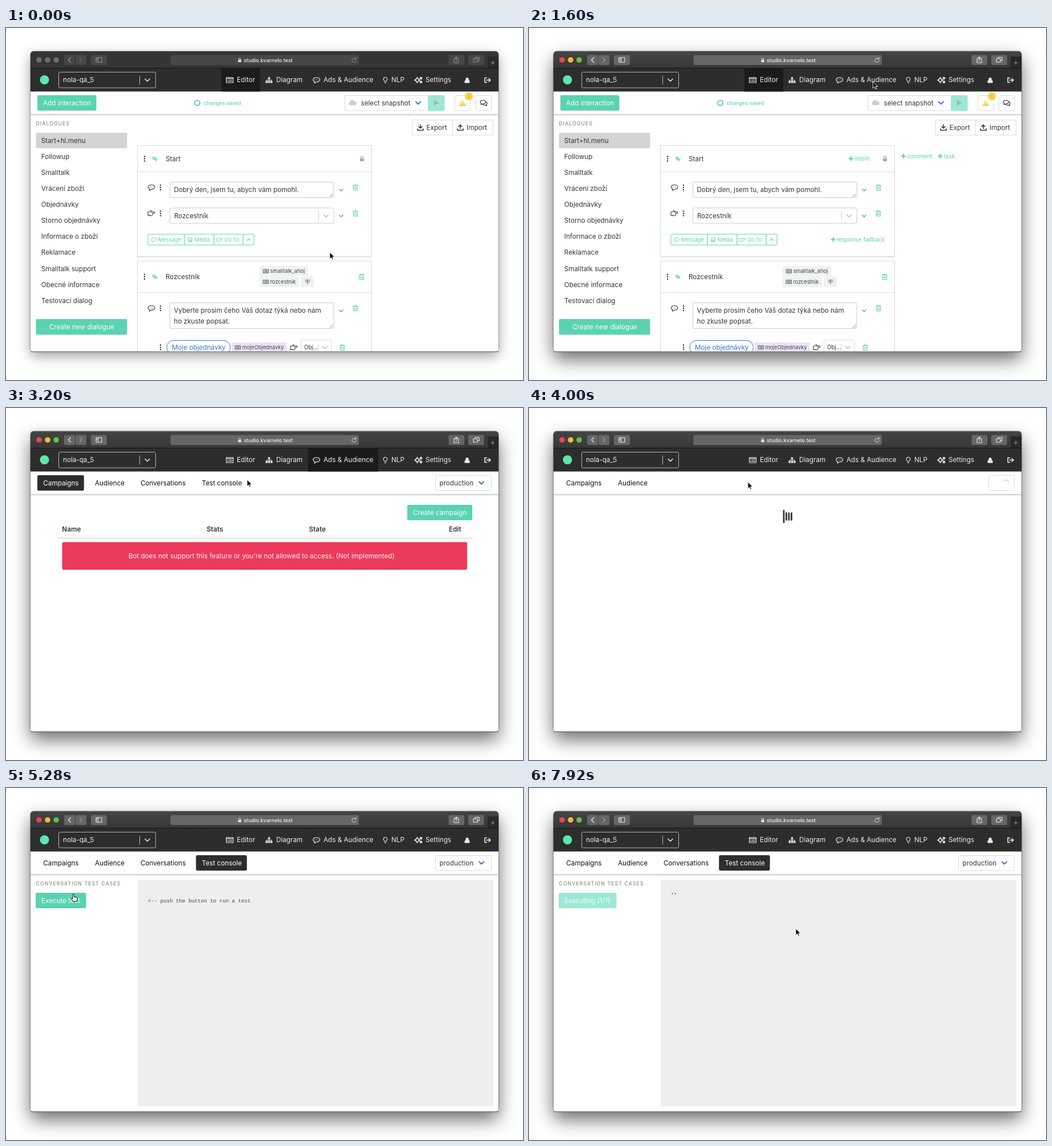
These frames come from a looping animation (907x618 px, 8000 ms). An HTML page:

```html
<!DOCTYPE html>
<html lang="en">
<head>
<meta charset="utf-8">
<title>Bot editor</title>
<style>
html, body { margin: 0; width: 100%; height: 100%; overflow: hidden; background: #fff; }
#shadow { position: absolute; left: 43px; top: 41px; width: 821px; height: 527px; border-radius: 6px;
  box-shadow: 0 0 1px 1px rgba(0,0,0,.35), 0 14px 32px rgba(0,0,0,.58); }
#shadow.idle { box-shadow: 0 0 1px 1px rgba(0,0,0,.3), 0 8px 22px rgba(0,0,0,.38); }
svg { position: absolute; left: 0; top: 0; }
text { font-family: Inter, Roboto, sans-serif; white-space: pre; }
</style>
</head>
<body>
<div id="shadow"></div>
<svg id="stage" width="907" height="618" viewBox="0 0 907 618"></svg>
<script>
const TEAL = '#5bd2b2', PALE = '#9ce8d6', INK = '#363636', DARK = '#2d2d2d', LINE = '#dbdbdb', BLUE = '#3b74cf', LIGHT = '#eee';
const $ = id => document.getElementById(id);

// Outline icons, centred on 0,0
const OUTLINE = {
  down: 'M-4-2L0 2 4-2', up: 'M-3 1.5L0-1.5 3 1.5', left: 'M2-4L-2 0 2 4', right: 'M-2-4L2 0-2 4',
  dots: 'M0-4h.01M0 0h.01M0 4h.01',
  comment: 'M0-4.5C8-4.5 8 3 0 3.2L-3.5 5.2-3 2.6C-8 1-6-4.5 0-4.5ZM-2.6-.6h.1M0-.6h.1M2.6-.6h.1',
  hand: 'M-6-2.5h2.5l2-2.3q2-.5 1 2.2h5.5q1.8 1.2 0 2.4h-3q1 4.2-3 4.3l-3-.7h-2Z',
  trash: 'M-4.5-3.5h9M-1.5-3.5v-1.3h3v1.3M-3.5-3.5v8.3h7v-8.3M-1.2-1.3v4M1.2-1.3v4',
  link: 'M-3.8-1.2l2-2 2.4 2.4-2 2ZM-.4 .8l2-2 2.4 2.4-2 2Z',
  keys: 'M-4.5-3h9v6h-9zM-2.8-1h5.6M-2.8 1h5.6',
  list: 'M-6-4.5h12v9h-12zM-6-3h12M-4-.5h1M-1.5-.5h5.5M-4 2h1M-1.5 2h5.5',
  bulb: 'M-1.5 2.5c0-2-1.8-2-1.8-4.2a3.3 3.3 0 0 1 6.6 0c0 2.2-1.8 2.2-1.8 4.2zM-1.2 4.7h2.4',
  cogs: 'M-5 0a3 3 0 1 0 6 0a3 3 0 1 0-6 0M-2-4.8v1M-2 3.8v1M-6.8 0h1M1.8 0h1M3-3.3a1.5 1.5 0 1 0 3 0a1.5 1.5 0 1 0-3 0M3 3.3a1.5 1.5 0 1 0 3 0a1.5 1.5 0 1 0-3 0',
  exit: 'M-1.5-4h-3.5v8h3.5M-2 0h6M2-2.7l3 2.7-3 2.7',
  save: 'M0-5v6M-3-1.5l3 3 3-3M-5 2.5v2.5h10v-2.5',
  load: 'M0 2v-6M-3-1.5l3-3 3 3M-5 2.5v2.5h10v-2.5',
  chat: 'M-1-4.5c6 0 6 6 0 6l-4 1.5 1-2c-4-2-2-5.5 3-5.5zM4.5-2c2.5 2 1.5 4 0 5l1 2-4-1.2q-2 .3-3-.8',
  image: 'M-4-4h8v8h-8zM-3 3l2-3 1.5 1.5 1.2-2 1.3 3.5zM-1.6-2h.1',
  sign: 'M0-4v8M-4-2.8h8M-4 0h8',
  plus: 'M-3.2 0h6.4M0-3.2v6.4',
  panel: 'M-5-4h10v8h-10zM-1.5-4v8M-4-2h1M-4 0h1',
  share: 'M-2-2h-2v7h8v-7h-2M0 2v-7M-2-3l2-2 2 2',
  tabs: 'M-5-2h7v6h-7zM-2-2v-2.5h7v6h-3',
  reload: 'M3.5-2a4 4 0 1 0 .6 2.5M1-2.5h3v-3'
};
const SOLID = {
  lock: 'M-3.5 0h1v-2a2.5 2.5 0 0 1 5 0v2h1v5h-7ZM-1.2 0h2.4v-2a1.2 1.2 0 0 0-2.4 0Z',
  tree: 'M-1.8-5h3.6v3h-3.6zM-6 1.5h3.4v3.4h-3.4zM-1.7 1.5h3.4v3.4h-3.4zM2.6 1.5h3.4v3.4h-3.4zM-4.8-.5h9.6v1h-9.6zM-.5-2h1v4h-1zM-4.8 0h1v2h-1zM3.8 0h1v2h-1z',
  user: 'M-4.5 5q-.5-5 2-5a2.9 2.9 0 1 1 5 0q2.5 0 2 5z',
  cloud: 'M-4 4a3.2 3.2 0 0 1-.5-6a4 4 0 0 1 7.6-.6a3.2 3.2 0 0 1 .9 6.6z',
  play: 'M-4.5-5L5 0-4.5 5z',
  warn: 'M0-5.5L6.5 5.5h-13z'
};

const path = (d, fill, stroke = 'none', w = 1, more = '') =>
  `<path d="${d}" fill="${fill}" stroke="${stroke}" stroke-width="${w}" stroke-linecap="round" stroke-linejoin="round" ${more}/>`;
const icon = (name, x, y, color = INK, w = 1.1, scale = 1) => {
  const at = `transform="translate(${x} ${y}) scale(${scale})"`;
  return SOLID[name] ? path(SOLID[name], color, 'none', 0, at) : path(OUTLINE[name], 'none', color, w, at);
};
const box = (x1, y1, x2, y2, fill = '#fff', stroke = 'none', r = 2) =>
  `<rect x="${x1}" y="${y1}" width="${x2 - x1}" height="${y2 - y1}" rx="${r}" fill="${fill}" stroke="${stroke}"/>`;
const dot = (x, y, r, fill, more = '') => `<circle cx="${x}" cy="${y}" r="${r}" fill="${fill}" ${more}/>`;
const rule = (x1, y1, x2, y2, color = LINE, w = 1) => path(`M${x1} ${y1}L${x2} ${y2}`, 'none', color, w);
// y is the middle of the capitals
const text = (x, y, s, color = INK, size = 11.7, more = '') =>
  `<text x="${x}" y="${y + size * .36}" fill="${color}" font-size="${size}" ${more}>${s.replace(/&/g, '&amp;').replace(/</g, '&lt;')}</text>`;
const label = (y, s) => text(52.5, y, s, '#777', 8.7, 'letter-spacing="1.1"');
const button = (x1, y1, x2, s, fill = TEAL, color = '#f4fffb') =>
  box(x1, y1, x2, y1 + 27, fill) + text(x1 + 10, y1 + 13.5, s, color);
const group = (id, body) => `<g id="${id}">${body}</g>`;

function titleBar(on) {
  const btn = on ? '#666' : '#474747', fg = on ? '#e8e8e8' : '#929292';
  const lights = on ? ['#ea4459', '#f6b73c', '#5fc148'] : ['#6d6d6d', '#6d6d6d', '#6d6d6d'];
  return box(43, 41, 864, 71, on ? 'url(#bar)' : '#353535', 'none', 0) +
    lights.map((c, i) => dot(58 + i * 15, 56, 4.8, c)).join('') +
    [[102, 121], [122, 141], [149, 177], [288.5, 619], [776.5, 804], [811, 838.5]]
      .map(([a, b]) => box(a, 47.5, b, 65, btn, 'none', 2.5)).join('') +
    icon('left', 111.5, 56, fg, 1.3) + icon('right', 131.5, 56, on ? '#999' : '#666', 1.2) +
    icon('panel', 163, 56, fg) + icon('lock', 410, 56, '#ddd', 1, .8) +
    text(417, 56.3, 'studio.kvarnelo.test', '#f2f2f2', 9.05, 'font-weight="500"') +
    icon('reload', 610.5, 56.5, fg, 1, .9) + icon('share', 790, 56, fg) + icon('tabs', 825, 56, fg) +
    box(845, 50, 864, 70, '#282828', 'none', 0) + icon('plus', 854, 61, '#999', 1) +
    rule(43, 70.5, 864, 70.5, '#151515');
}

const nav = box(43, 71, 864, 111.5, DARK, 'none', 0) +
  group('navEditor', box(378, 71, 446, 111.5, '#1b1b1b', 'none', 0)) +
  group('navAds', box(530, 71, 653, 111.5, '#1b1b1b', 'none', 0)) +
  dot(67.5, 91, 8, '#5ee6ad') +
  box(92.5, 77.5, 262.5, 105, DARK, '#b5b5b5') + text(100, 91, 'nola-qa_5', LIGHT) +
  rule(234.5, 84, 234.5, 99, '#bbb') + icon('down', 248, 91.5, LIGHT, 1.5) +
  [['list', 392.5, 'Editor', 405], ['tree', 461.5, 'Diagram', 474], ['comment', 544.5, 'Ads & Audience', 557],
   ['bulb', 665.5, 'NLP', 676], ['cogs', 723.5, 'Settings', 736]]
    .map(([i, x, s, tx]) => icon(i, x, 91.5, LIGHT, i == 'cogs' ? 1.7 : 1.1) + text(tx, 91, s, LIGHT)).join('') +
  icon('user', 809, 91.5, LIGHT) + icon('exit', 845, 91.5, LIGHT, 1.5) +
  box(43, 151, 864, 155, 'url(#edge)', 'none', 0);

const card = (y1, y2, head) => box(230.5, y1 + 1, 641.5, y2 + 1.5, '#ddd', 'none', 0) +
  box(230.5, y1, 641, y2, '#fff', LINE, 0) + rule(231, head, 640, head) +
  icon('dots', 243, (y1 + head) / 2, INK, 2.6) + icon('link', 261, (y1 + head) / 2, TEAL, 1.3);
const row = (y, kind, h = 27) => icon(kind, 255, y, INK, 1.1) + icon('dots', 271, y, INK, 2.6) +
  box(287.5, y - 9.5, 575, y - 9.5 + h, '#fff', '#ccc') + icon('down', 588, y + 4.5, BLUE, 1.3, .8) + icon('trash', 613, y, TEAL);
const grip = y => path(`M568 ${y}l5-5M571 ${y}l2-2`, 'none', '#777', .8);
const add = (x, y, s) => icon('plus', x, y, TEAL, 2) + text(x + 6, y, s, TEAL, 10.1);
const tool = (x1, x2, i, s) => box(x1, 362, x2, 381, '#fff', TEAL, 1) +
  icon(i, x1 + 10, 371.8, TEAL, 1.1, .8) + text(x1 + 18, 371.5, s, TEAL, 9.3);
const tag = (x1, y, x2, s, fill) => box(x1, y - 9, x2, y + 9, fill) + icon('keys', x1 + 11, y, '#555', 1) + text(x1 + 18.5, y, s, '#444', 9.2);

const dialogues = ['Start+hl.menu', 'Followup', 'Smalltalk', 'Vrácení zboží', 'Objednávky', 'Storno objednávky',
  'Informace o zboží', 'Reklamace', 'Smalltalk support', 'Obecné informace', 'Testovací dialog'];

const editor = button(55, 118, 158.5, 'Add interaction') +
  dot(335.5, 131.5, 4.5, 'none', `stroke="${TEAL}" stroke-width="2"`) +
  text(347, 131.3, 'changes saved', TEAL, 9.05, 'font-weight="500"') +
  box(594.5, 118.5, 769, 145, '#fff', LINE) + box(740, 118, 769.5, 145.5, PALE) +
  icon('cloud', 608, 131.5, '#ccc') + text(622.5, 131.5, 'select snapshot') +
  icon('down', 723, 131.5, BLUE, 2) + icon('play', 755, 131.5, '#a3b5b0') +
  box(787.5, 118.5, 815, 145, '#fff', LINE) + icon('warn', 801, 131.5, '#fad55c') + rule(801, 129, 801, 133, '#fff', 1.3) +
  dot(812, 120, 7, '#fbd04e') + text(810.2, 120, '1', '#e0a92c', 7) +
  box(824.5, 118.5, 851.5, 145, '#fff', LINE) + icon('chat', 838, 131.5, INK, 1.2) +
  label(167.5, 'DIALOGUES') + box(52.5, 184, 212.5, 211, '#d3d3d3') +
  dialogues.map((s, i) => text(61.8, 197.5 + i * 28.1, s)).join('') +
  box(52.5, 511, 212.5, 538.5, TEAL) + text(76, 524.8, 'Create new dialogue', '#f4fffb') +
  box(713, 161.5, 854.5, 188, '#fff', LINE) + rule(783.5, 162, 783.5, 188) +
  icon('save', 727, 174.5, INK, 1.6) + text(737.5, 175, 'Export') + icon('load', 797, 174.5, INK, 1.6) + text(808, 175, 'Import') +
  card(206.5, 401, 252.5) + text(280, 229.5, 'Start') + icon('lock', 624.5, 229, '#aaa') +
  row(280, 'comment') + text(294.5, 284, 'Dobrý den, jsem tu, abych vám pomohl.') + grip(296) +
  row(325.5, 'hand') + text(295, 329.8, 'Rozcestník') + rule(548.5, 322, 548.5, 337, '#ccc') + icon('down', 561.5, 330, '#bbb', 1.6) +
  tool(249, 313, 'comment', 'Message') + tool(313, 365, 'image', 'Media') + tool(365, 416, 'hand', 'Go To') +
  box(416, 362, 435, 381, '#fff', TEAL, 1) + icon('up', 425.5, 371.5, TEAL) +
  group('hover', add(565, 229.5, 'intent') + add(533.5, 371.5, 'response fallback') + add(657, 225, 'comment') + add(721.5, 225, 'task')) +
  card(409, 600, 464.5) + text(280, 437, 'Rozcestník') + icon('trash', 624, 437, TEAL) +
  tag(445, 427, 530, 'smalltalk_ahoj', '#f1f1f1') + tag(445, 445.7, 514, 'rozcestnik', '#ecf3f0') +
  box(517.5, 436.7, 540, 454.7, '#f0f0f0') + icon('sign', 529, 445.7, '#888', 1.3) +
  row(492, 'comment', 45) + text(294.5, 496, 'Vyberte prosím čeho Váš dotaz týká nebo nám') + text(294.5, 514.5, 'ho zkuste popsat.') + grip(526) +
  icon('dots', 271, 560.5, INK, 2.6) + box(282, 548.5, 393.5, 573, '#fff', BLUE, 12) + text(291, 560.8, 'Moje objednávky', BLUE) +
  tag(396, 560.8, 493, 'mojeObjednavky', '#ebe3f8') + icon('hand', 505, 561, INK) +
  box(517.5, 548, 571, 576, '#fff', LINE) + text(523, 560.5, 'Obj...', INK, 9.8) + rule(547.5, 554, 547.5, 567) +
  icon('down', 559.5, 561, '#bbb', 1.5) + icon('trash', 590, 561, TEAL);

const tab = (x, s, on) => on
  ? box(x - 10.3, 118, x + on, 145, DARK, 'none', 2.5) + text(x, 131.7, s, '#fff')
  : text(x, 131.7, s, '#111');
const tabs = (active, ready) => tab(65.3, 'Campaigns', active == 1 && 71.5) + tab(156, 'Audience') +
  (ready
    ? tab(236, 'Conversations') + tab(343.6, 'Test console', active == 2 && 79) +
      box(753.5, 118.5, 851.5, 145, '#fff', LINE) + text(760.5, 131.7, 'production') + icon('down', 834, 131.5, BLUE, 2)
    : box(806.5, 118.5, 851.5, 145, '#fff', LINE));

const campaigns = tabs(1, true) + button(704, 170, 818, 'Create campaign') +
  [[98.3, 'Name'], [352, 'Stats'], [531.5, 'State'], [777, 'Edit']]
    .map(([x, s]) => text(x, 213, s, INK, 11.7, 'font-weight="600"')).join('') +
  rule(90, 228.5, 818, 228.5, LINE, 1.5) + box(98.5, 235.5, 809, 284, '#ec3a5c', 'none', 3) +
  text(214.7, 260, "Bot does not support this feature or you're not allowed to access. (Not implemented)", '#ffeef1');

const consoleBase = tabs(2, true) + label(167.5, 'CONVERSATION TEST CASES') + box(231, 161, 855, 559, LIGHT, 'none', 0);
const ready = button(52, 184, 140.5, 'Execute test') +
  text(249, 197.3, '<-- push the button to run a test', '#444', 9.1, 'style="font-family:\'Liberation Mono\',monospace"');
const running = button(52, 184, 153.5, 'Executing (1/?)', PALE) +
  dot(251.5, 185.5, .9, '#333', 'id="dot1"') + dot(257, 185.5, .9, '#333', 'id="dot2"');

$('stage').innerHTML = `<defs>
  <linearGradient id="bar" x2="0" y2="1"><stop stop-color="#444"/><stop offset="1" stop-color="#373737"/></linearGradient>
  <linearGradient id="edge" x2="0" y2="1"><stop stop-color="#bdbdbd"/><stop offset=".4" stop-color="#e4e4e4"/><stop offset="1" stop-color="#fff"/></linearGradient>
  <clipPath id="win">${box(43, 41, 864, 568.5, '#fff', 'none', 5)}</clipPath></defs>
  <g clip-path="url(#win)">` + box(43, 41, 864, 569, '#fff', 'none', 0) +
  group('barOff', titleBar(false)) + group('barOn', titleBar(true)) + nav +
  group('editor', editor) + group('wait1', tabs(1)) + group('wait2', tabs(0)) + group('campaigns', campaigns) +
  group('console', consoleBase) + group('ready', ready) + group('running', running) +
  group('loader', [0, 1, 2, 3].map(i => `<rect id="line${i}" x="${445.6 + i * 4.5}" width="2.8" rx="1.3" fill="${INK}"/>`).join('') +
    path('M-5 0A5 5 0 0 1 2-4.6', 'none', '#ccc', 1.3, 'id="ring"')) +
  `</g>` + path('M43.5 568.3H864', 'none', '#333', .8) +
  group('cursor',
    path('M0 0v11.5l2.7-2.5 1.8 4 1.9-.8-1.8-4h3.6z', '#000', '#fff', .9, 'id="arrow"') +
    path('M-1.2 1q1.2-1.6 2.4 0v4l5 1.2q1.2.5.9 2.5l-1 4.3h-6l-3.6-4.6q0-1.6 2.3-.2z', '#fff', '#000', 1, 'id="finger"'));

const FOCUS = 160, ADS = 1840, LOADED = 2800, TEST = 3680, CONSOLE = 4560, RUN = 5440;
const moves = [[0, 568, 394], [160, 568, 394], [720, 639, 158], [1040, 634, 146], [1680, 602, 92], [2720, 602, 92],
  [3200, 423, 126], [3600, 384, 130], [4480, 384, 130], [5200, 118, 186], [5760, 118, 186], [7040, 468, 247], [8000, 468, 247]];

function pointer(t) {
  const i = moves.findIndex(m => m[0] > t), [t0, x0, y0] = moves[i - 1], [t1, x1, y1] = moves[i];
  const u = (t - t0) / (t1 - t0), e = u * u * (3 - 2 * u);
  return [x0 + (x1 - x0) * e, y0 + (y1 - y0) * e];
}
const show = (id, on) => $(id).style.display = on ? '' : 'none';

function draw(now) {
  const t = Math.floor(now % 8000 / 80) * 80;
  const within = (a, b) => t >= a && t < b;
  const focused = t >= FOCUS;
  $('shadow').className = focused ? '' : 'idle';
  show('barOn', focused);
  show('barOff', !focused);
  show('hover', focused);
  show('editor', t < ADS);
  show('navEditor', t < ADS);
  show('navAds', within(ADS, TEST));
  show('wait1', within(ADS, LOADED));
  show('campaigns', within(LOADED, TEST));
  show('wait2', within(TEST, CONSOLE));
  show('console', t >= CONSOLE);
  show('ready', within(CONSOLE, RUN));
  show('running', t >= RUN);
  show('dot1', t >= 6160);
  show('dot2', t >= 7040);
  show('loader', within(ADS, LOADED) || within(TEST, CONSOLE));

  for (let i = 0; i < 4; i++) {
    const age = (t - 2140 - i * 120 + 1740) % 870;
    const h = 14.5 + (age > 0 && age < 240 ? 8.5 * Math.sin(Math.PI * age / 240) : 0);
    $('line' + i).setAttribute('height', h);
    $('line' + i).setAttribute('y', 190.5 - h / 2);
  }
  $('ring').setAttribute('transform', `translate(837 131.5) rotate(${(t - 2160) * 360 / 561 - 55})`);

  const [x, y] = pointer(t), hand = t >= CONSOLE && x > 52 && x < 141 && y > 184 && y < 211;
  $('cursor').setAttribute('transform', `translate(${x} ${y})`);
  show('arrow', !hand);
  show('finger', hand);
}
function tick() {
  draw(performance.now());
  requestAnimationFrame(tick);
}
tick();
</script>
</body>
</html>
```
